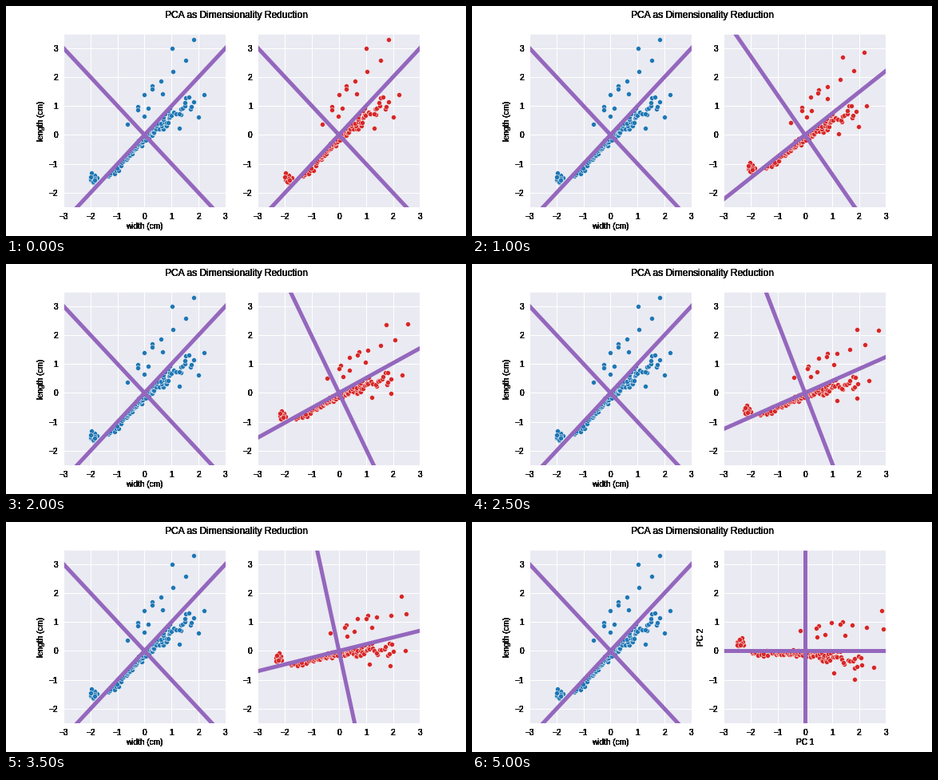
Write a matplotlib script that moves like this. It is 576x288 px and loops after 6500 ms.

```python
import numpy as np
import matplotlib.pyplot as plt
from matplotlib.animation import FuncAnimation

W, H, DPI = 576, 288, 72
INK, PURPLE = ".08", "#9467bd"
STEPS, HOLD, STEP_MS = 10, 3, 500
plt.rcParams["font.family"] = "Liberation Sans"

# Outliers that stand clear of the band, as (width, length)
OUTLIERS = [
    (1.83, 3.30), (1.02, 3.00), (1.53, 2.58), (1.04, 2.20), (0.60, 1.86),
    (0.28, 1.70), (0.28, 1.58), (0.66, 1.42), (0.00, 1.39), (-0.26, 0.98),
    (-0.26, 0.86), (0.13, 0.92), (-0.02, 0.64), (-0.63, 0.37),
    (2.21, 1.40), (2.00, 0.61), (1.29, 0.23),
]


def to_axes(pts):
    """Coordinates along and across the diagonal."""
    x, y = pts.T
    return np.column_stack([x + y, y - x]) / np.sqrt(2)


def from_axes(along, across):
    return np.column_stack([along - across, along + across]) / np.sqrt(2)


def make_data():
    rng = np.random.default_rng(4)
    cluster = rng.normal((-1.87, -1.55), (0.07, 0.1), (12, 2))
    # A narrow band, densest in the middle, that fans out and sags rightwards
    v = np.linspace(-1, 1, 106)
    along = 0.05 + 2.05 * v * (0.6 + 0.4 * v**2) + rng.normal(0, 0.03, v.size)
    fan = np.clip(along, 0, None)
    noise = np.clip(rng.normal(0, 1, v.size), -1.8, 1.8)
    across = -0.08 - 0.15 * fan + noise * (0.06 + 0.06 * fan)
    return np.vstack([OUTLIERS, cluster, from_axes(along, across)])


def write(x, y, text, size=10, **kw):
    """Text at pixel coordinates, overprinted so its edges come out heavy."""
    style = dict(ha="center", va="baseline", rotation_mode="anchor",
                 color=INK, fontsize=size)
    style.update(kw)
    return [fig.text(x / W, 1 - y / H, text, **style) for _ in range(10)]


def make_panel(ax, color):
    ax.set(xlim=(-3, 3), ylim=(-2.5, 3.5), facecolor="#eaeaf2",
           xticks=range(-3, 4), yticks=range(-2, 4))
    ax.set_axisbelow(True)
    ax.grid(color="white", lw=1)
    ax.tick_params(length=0, labelbottom=False, labelleft=False)
    ax.spines[:].set_color("white")
    box = ax.get_position()
    left, bottom = box.x0 * W, (1 - box.y0) * H
    for v in range(-3, 4):
        name = str(v).replace("-", "\u2212")
        write(left + (v + 3) / 6 * box.width * W, 267, name)
        if v > -3:
            y = bottom - (v + 2.5) / 6 * box.height * H
            write(left - 7, round(y + 4), name, ha="right")
    dots = ax.scatter(*data.T, s=36, color=color, edgecolor="white", lw=0.5)
    lines = [ax.plot([], [], color=PURPLE, lw=5)[0] for _ in range(2)]
    return dots, lines


def pose(dots, lines, t):
    """Blend linearly from the raw coordinates to the diagonal ones."""
    def blend(pts):
        return (1 - t) * pts + t * to_axes(pts)

    dots.set_offsets(blend(data))
    for line, side in zip(lines, (1, -1)):
        ends = np.array([(-10, -10 * side), (10, 10 * side)])
        line.set_data(*blend(ends).T)


def update(i):
    pose(*right, min(i, STEPS) / STEPS)
    for label in pc_labels:
        label.set_visible(i >= STEPS)


data = make_data()
fig, axes = plt.subplots(1, 2, figsize=(W / DPI, H / DPI), dpi=DPI,
                         facecolor="white")
fig.subplots_adjust(left=0.125, right=0.9, bottom=0.125, top=0.88, wspace=0.2)

left = make_panel(axes[0], "#1f77b4")
right = make_panel(axes[1], "#d62728")
pose(*left, 0)

write(288, 0.02 * H, "PCA as Dimensionality Reduction", 12, va="top")
write(173.5, 279, "width (cm)")
write(47, 143.5, "length (cm)", rotation=90)
pc_labels = write(417, 279, "PC 1") + write(290, 143.5, "PC 2", rotation=90)

anim = FuncAnimation(fig, update, frames=STEPS + HOLD, interval=STEP_MS,
                     init_func=lambda: update(0), repeat=True, repeat_delay=0)
plt.show()
```
